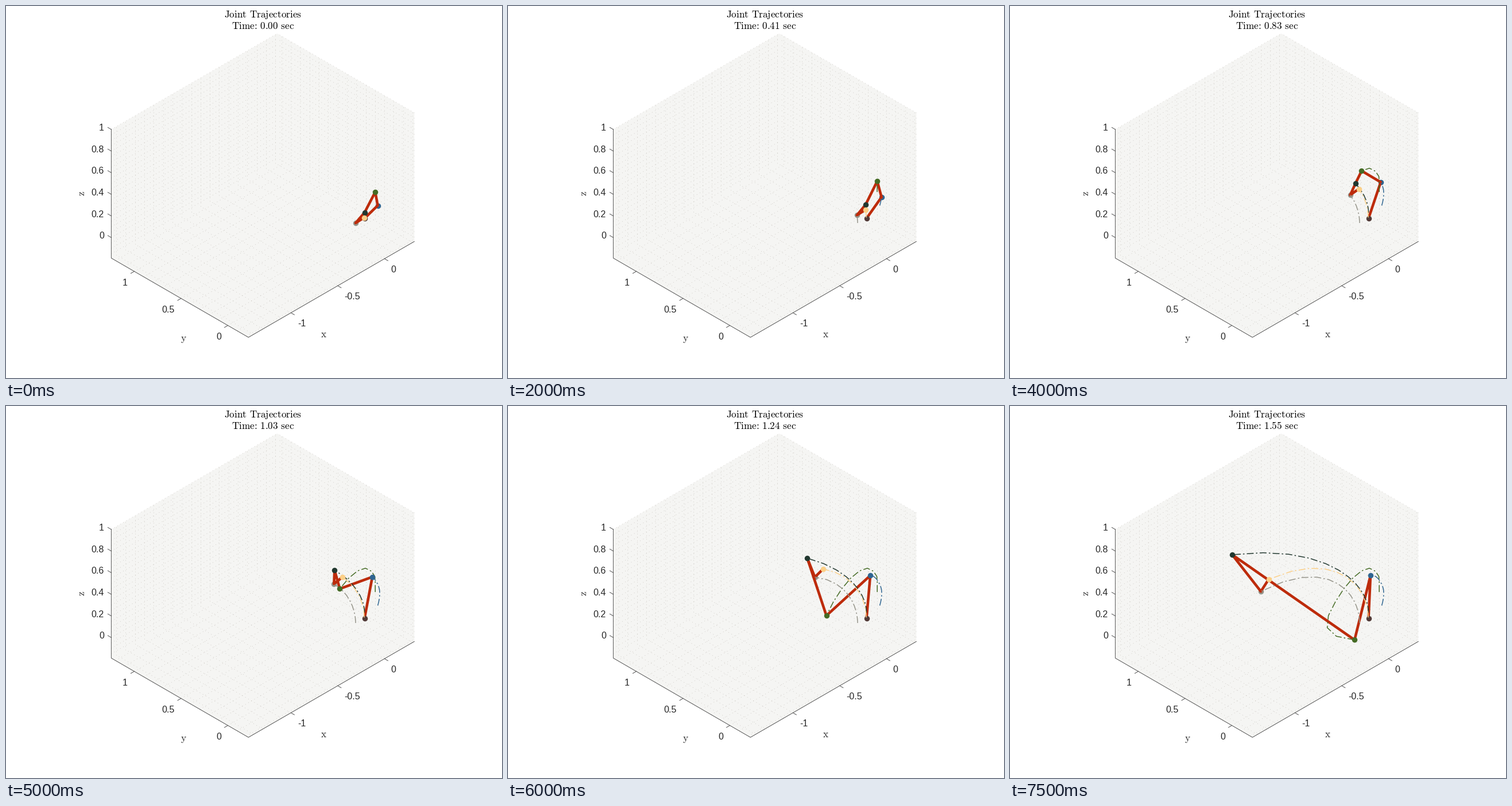
A matplotlib script that plays this animation: 864x648 px, repeating every 8 s.

```python
import numpy as np
import matplotlib.pyplot as plt
from matplotlib.animation import FuncAnimation
from matplotlib.collections import LineCollection

plt.rcParams.update({"mathtext.fontset": "cm", "font.family": "Liberation Sans",
                     "lines.scale_dashes": False, "toolbar": "None"})

W, H, STEPS, DT = 864, 648, 16, 3.1 / 30
INK, EDGE, RED = "#262626", "#484848", "#bd2b0b"

fig = plt.figure(figsize=(W / 72, H / 72), dpi=72, facecolor="white")
ax = fig.add_axes([0, 0, 1, 1])
ax.set(xlim=(0, W), ylim=(H, 0))
ax.axis("off")

# Isometric box: pixel vectors per data unit
EX, EY, EZ = np.array([[163, -94.2], [-163, -94.2], [0, -188.3]])
LO = np.array([-1.454, -0.22, -0.19])
HI = np.array([0.319, 1.246, 1.0])
CORNER = np.array([422.3, 577.2])


def project(x, y, z):
    d = np.array([x, y, z]) - LO
    return CORNER + d[0] * EX + d[1] * EY + d[2] * EZ


def edge(*points):
    ax.plot(*np.transpose(points), color=EDGE, lw=0.9, zorder=2)


def roman(text):
    body = text.replace(" ", r"\hspace{0.38}").replace(":", r"\hspace{-0.2}:\hspace{-0.2}")
    return r"$\mathrm{" + body + "}$"


def tex(x, y, text, color="black", **kw):
    kw = {"ha": "center", "va": "baseline", **kw}
    return ax.text(x, y, roman(text) if text else "", size=17.2, color=color, **kw)


def multiples(lo, hi, step):
    return np.arange(np.ceil(lo / step - 1e-6), np.floor(hi / step + 1e-6) + 1) * step


def draw_box():
    (x0, y0, z0), (x1, y1, z1) = LO, HI
    hexagon = [project(*p) for p in ((x0, y0, z0), (x1, y0, z0), (x1, y0, z1),
                                     (x1, y1, z1), (x0, y1, z1), (x0, y1, z0))]
    ax.fill(*np.transpose(hexagon), color="#f5f5f3", lw=0, zorder=0)

    grid = []
    for x in multiples(x0, x1, 0.1):
        grid.append([project(x, y1, z0), project(x, y1, z1)])
        grid.append([project(x, y0, z0), project(x, y1, z0)])
    for y in multiples(y0, y1, 0.1):
        grid.append([project(x1, y, z0), project(x1, y, z1)])
        grid.append([project(x0, y, z0), project(x1, y, z0)])
    for z in multiples(z0, z1, 0.05):
        grid.append([project(x0, y1, z), project(x1, y1, z)])
        grid.append([project(x1, y0, z), project(x1, y1, z)])
    ax.add_collection(LineCollection(grid, colors="#857a70", alpha=0.38, linewidths=0.8,
                                     linestyles=[(0, (1, 5))], zorder=1))
    edge(project(x0, y1, z1), project(x0, y1, z0), project(x0, y0, z0), project(x1, y0, z0))


def tick(at, step, value, shift, align):
    edge(at, at + step)
    ax.text(*(at + shift), f"{value:g}", size=16, color=INK, ha=align, va="center_baseline")


def draw_labels():
    for x in (-1, -0.5, 0):
        tick(project(x, LO[1], LO[2]), (6, 3.5), x, (11.5, 18), "left")
    for y in (0, 0.5, 1):
        tick(project(LO[0], y, LO[2]), (-6, 3.5), y, (-11.5, 19), "right")
    for z in np.arange(6) / 5:
        tick(project(LO[0], HI[1], z), (-6, -3.5), z, (-12.5, -4), "right")
    tex(553.5, 577.3, "x", INK)
    tex(309, 584.3, "y", INK)
    tex(132.5, 327, "z", INK, rotation=90, va="center")
    tex(447.5, 20.3, "Joint Trajectories")


def smooth(k, start, length):
    u = np.clip((k - start) / length, 0, 1)
    return u * u * (3 - 2 * u)


def joint_paths():
    """Pixel path of every joint, in the order of the chain."""
    k = np.arange(STEPS)
    s = k / (STEPS - 1)
    lift = smooth(k, 0, 11.5)

    def path(x, y):
        return np.column_stack([x, y])

    # Crank: rises above the base while swinging outward, then back
    blue = path(647.5 + 3.5 * smooth(k, 0, 5) - 23 * smooth(k, 5.3, 8.7),
                347.5 - 52.2 * lift)
    # Knee: up, over to the left, down, and a late kick to the right
    kick = np.clip((k - 12) / 3, 0, 1) ** 2
    green = path(643.2 - 100 * smooth(k, 4.5, 9.5) + 57 * kick,
                 324 - 68 * lift + 151.5 * smooth(k, 6.2, 8.9))
    # End plate: gray leads, the other two corners open up away from it
    gray = path(609 - 172 * s**3.75, 378 - 180 * s**1.95 + 125 * s**5.5)
    dark = gray + path(15.5 - 65.5 * s**3.7, -18 - 46 * s**5)
    peach = gray + path(15 - 1.5 * s**4, -9.5 - 11.5 * s**4)
    return {"blue": blue, "green": green, "dark": dark, "gray": gray, "peach": peach}


draw_box()
draw_labels()
clock = tex(447.5, 40.3, "")

BASE = (624.5, 370)
COLORS = {"blue": "#2f6591", "green": "#456b25", "dark": "#22382f",
          "gray": "#95948a", "peach": "#fcd088"}
paths = joint_paths()

links, = ax.plot([], [], color=RED, lw=4.6, solid_capstyle="round",
                 solid_joinstyle="round", zorder=5)
ax.plot(*BASE, "o", ms=9.5, mew=0, color="#523b38", zorder=6)
trails, dots = {}, {}
for name, color in COLORS.items():
    trails[name], = ax.plot([], [], color=color, lw=1.5, dash_capstyle="butt",
                            linestyle=(0, (12, 4, 2.5, 4)), zorder=7)
    dots[name], = ax.plot([], [], "o", ms=9.5, mew=0, color=color,
                          zorder=4 if name == "gray" else 8)


def update(k):
    clock.set_text(roman(f"Time: {k * DT:.2f} sec"))
    links.set_data(*np.array([BASE] + [p[k] for p in paths.values()]).T)
    for name, p in paths.items():
        trails[name].set_data(*p[:k + 1].T)
        dots[name].set_data(*p[k:k + 1].T)
    # The crank joint passes in front of the links halfway through
    dots["blue"].set_zorder(4 if k < 10 else 8)
    return [clock, links, *trails.values(), *dots.values()]


anim = FuncAnimation(fig, update, frames=STEPS, init_func=lambda: update(0),
                     interval=500, repeat=True, repeat_delay=0, blit=False)
plt.show()
```
